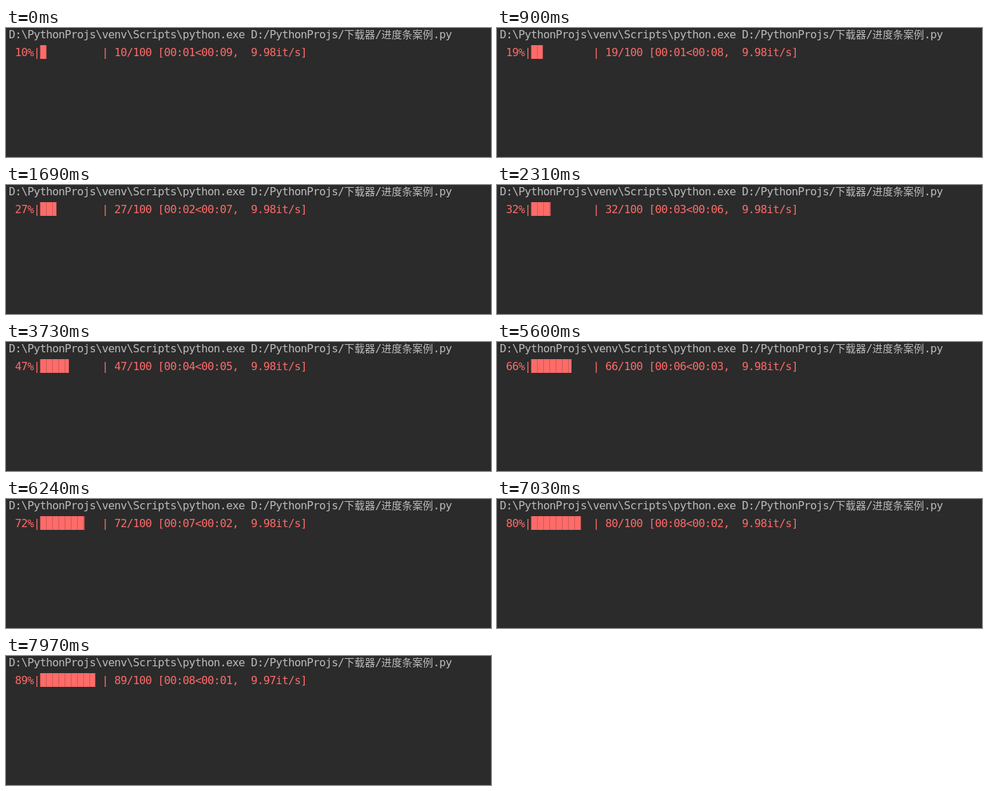
Write an HTML page that moves like this. It is 703x188 px and loops after 8000 ms.

```html
<!DOCTYPE html>
<html lang="zh-CN">
<head>
<meta charset="utf-8">
<title>Progress bar</title>
<style>
  html, body { margin: 0; width: 100%; height: 100%; overflow: hidden; background: #2b2b2b; }
  svg { display: block; }
  text {
    font: 16px "DejaVu Sans Mono", "Noto Sans Mono", monospace;
    letter-spacing: -0.633px;
    white-space: pre;
    fill: #bbbbbb;
  }
  .cjk { font: 300 15px "Noto Sans CJK SC", "Noto Sans CJK", sans-serif; letter-spacing: 0; }
  #status text, #status rect { fill: #ff6b68; }
</style>
</head>
<body>
<svg width="703" height="188" viewBox="0 0 703 188">
  <g id="command"></g>
  <g id="status"></g>
</svg>
<script>
const LOOP = 8000;
const CELL = 9, LEFT = 4, BAR_CELLS = 10;
const BAR_X = LEFT + 5 * CELL;

// Each run starts at [ms, items done], then gains RUN_GAIN items every RUN_STEP ms.
const RUN_STEP = 313, RUN_GAIN = 3;
const RUNS = [
  [0, 10], [120, 11], [270, 13], [1370, 24], [2310, 32], [2540, 35],
  [2770, 38], [4260, 52], [4490, 55], [5600, 66], [6710, 77]
];

const command = document.getElementById("command");
const status = document.getElementById("status");

function add(parent, tag, attrs, text = "") {
  const node = document.createElementNS("http://www.w3.org/2000/svg", tag);
  for (const key in attrs) node.setAttribute(key, attrs[key]);
  node.textContent = text;
  parent.appendChild(node);
  return node;
}

const label = (parent, x, y, text, cls = "") =>
  add(parent, "text", { x, y, class: cls }, text);

const clock = seconds => "00:" + String(Math.floor(seconds)).padStart(2, "0");

// Lay the pieces of the command line end to end.
let x = LEFT;
for (const part of ["D:\\PythonProjs\\venv\\Scripts\\python.exe D:/PythonProjs/",
                    "下载器", "/", "进度条案例", ".py"]) {
  const wide = part.charCodeAt(0) > 255;
  label(command, x, 15, part, wide ? "cjk" : "");
  x += part.length * (wide ? 15 : CELL);
}

const percent = label(status, LEFT, 41, "");
const stats = label(status, BAR_X + BAR_CELLS * CELL, 41, "");
// Half-pixel cell edges leave faint seams between the blocks.
const cells = Array.from({ length: BAR_CELLS }, (_, i) =>
  add(status, "rect", { x: BAR_X + 0.5 + i * CELL, y: 25, width: 0, height: 20 }));

function countAt(t) {
  const [start, base] = RUNS.findLast(([time]) => time <= t);
  return base + RUN_GAIN * Math.floor((t - start) / RUN_STEP);
}

function show(n) {
  const rate = n < 86 ? 9.98 : 9.97;
  // The bar grows by eighths of a cell.
  const filled = Math.floor(n * BAR_CELLS * 8 / 100) / 8;
  cells.forEach((cell, i) =>
    cell.setAttribute("width", CELL * Math.max(0, Math.min(1, filled - i))));
  percent.textContent = ` ${n}%|`;
  stats.textContent =
    `| ${n}/100 [${clock(n / rate)}<${clock((100 - n) / rate)},  ${rate}it/s]`;
}

let shown = 0;
const start = performance.now();

function tick() {
  const n = countAt((performance.now() - start) % LOOP);
  if (n !== shown) show(shown = n);
  requestAnimationFrame(tick);
}
tick();
</script>
</body>
</html>
```
